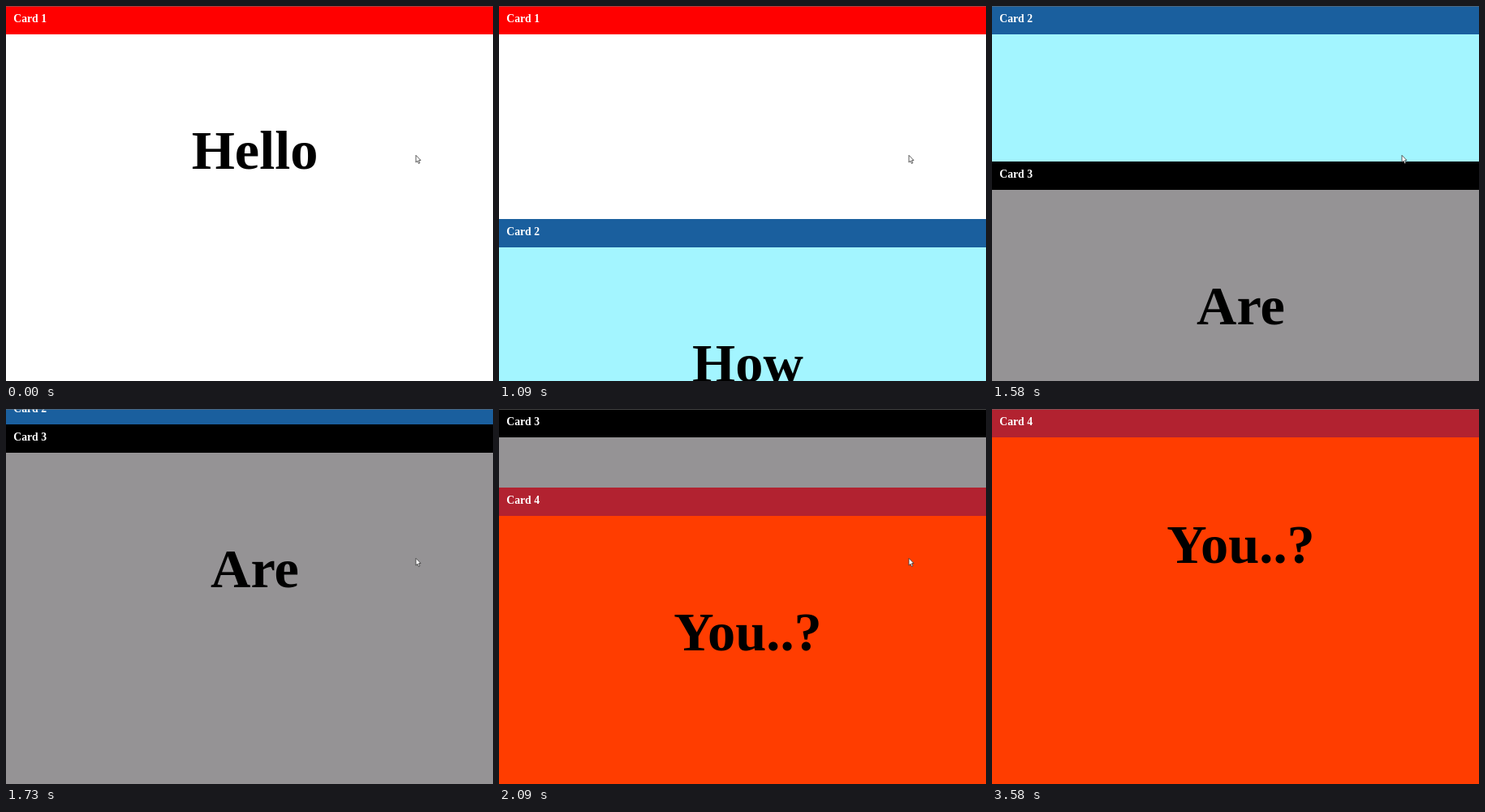
Recreate the animation shown at these times as an HTML page with a canvas. Size 600 by 463 pixels, loop 4.27 s.

```html
<!DOCTYPE html>
<html lang="en">
<head>
<meta charset="utf-8">
<title>Stacking cards</title>
<style>
  html, body { margin: 0; width: 100%; height: 100%; overflow: hidden; background: #fff; }
  canvas { display: block; }
</style>
</head>
<body>
<canvas id="stage" width="600" height="463"></canvas>
<script>
const ctx = document.getElementById('stage').getContext('2d');
const WIDTH = 600, HEIGHT = 463, LOOP = 4270;
const CARD_HEIGHT = 476, HEADER_HEIGHT = 35;
const SERIF = '"Liberation Serif", "Times New Roman", serif';

const cards = [
  { word: 'Hello', header: '#ff0000', body: '#ffffff' },
  { word: 'How', header: '#1a5f9e', body: '#a3f5ff' },
  { word: 'Are', header: '#000000', body: '#959395' },
  { word: 'You..?', header: '#b22230', body: '#ff3d00' },
];

// [time, scroll offset] while the wheel is turning
const scrollKeys = [
  [0, 0], [390, 0], [420, 7], [460, 15], [500, 21], [540, 25], [580, 28],
  [880, 28], [910, 33], [940, 48], [970, 74], [1300, 455],
  [1580, 760], [1910, 1141], [1970, 1217],
];
const SCROLL_END = 1439, COAST_START = 1970, COAST_TIME = 560;

// The picture advances in ticks of 30 ms
function tick(t) {
  const phase = t < 1500 ? 10 : t < 2300 ? 20 : 0;
  return Math.floor((t - phase) / 30) * 30 + phase;
}

function scrollAt(t) {
  if (t >= COAST_START) {
    const left = 1 - Math.min(1, (t - COAST_START) / COAST_TIME);
    return SCROLL_END - (SCROLL_END - 1217) * left ** 3;
  }
  const next = scrollKeys.findIndex(([time]) => time > t);
  if (next < 1) return 0;
  const [t0, s0] = scrollKeys[next - 1], [t1, s1] = scrollKeys[next];
  return s0 + (s1 - s0) * (t - t0) / (t1 - t0);
}

function fillBox(color, y, height) {
  ctx.fillStyle = color;
  ctx.fillRect(0, y, WIDTH, height);
}

function drawCard(card, index, scroll) {
  const top = index * CARD_HEIGHT - scroll;
  const bottom = top + CARD_HEIGHT;
  if (top >= HEIGHT || bottom <= 0) return;

  fillBox(card.body, top, CARD_HEIGHT);
  ctx.fillStyle = '#000';
  ctx.font = `bold 68.4px ${SERIF}`;
  ctx.textAlign = 'center';
  ctx.fillText(card.word, 306.5, top + 201);

  // Sticky header, pushed out by the end of its card
  const headerTop = Math.min(Math.max(top, 0), bottom - HEADER_HEIGHT);
  fillBox(card.header, headerTop, HEADER_HEIGHT);
  ctx.fillStyle = '#fff';
  ctx.font = `bold 13.7px ${SERIF}`;
  ctx.textAlign = 'left';
  ctx.fillText(`Card ${index + 1}`, 9.3, headerTop + 20);
}

function drawCursor(t) {
  if (t >= 3360) return;
  const away = Math.max(0, Math.floor((t - 3150) / 30) / 6) ** 1.4;
  ctx.save();
  ctx.translate(505 + 13 * away, 184.3 - 166 * away);
  ctx.beginPath();
  for (const [x, y] of [[0, 0], [0, 8.8], [2, 7], [3.4, 10.2], [4.8, 9.5], [3.5, 6.4], [6, 6.2]]) {
    ctx.lineTo(x, y);
  }
  ctx.closePath();
  ctx.fillStyle = '#fff';
  ctx.fill();
  ctx.lineWidth = 0.8;
  ctx.strokeStyle = '#333';
  ctx.stroke();
  ctx.restore();
}

function draw(now) {
  const t = now % LOOP;
  const scroll = Math.round(scrollAt(tick(t)));
  fillBox('#fff', 0, HEIGHT);
  cards.forEach((card, index) => drawCard(card, index, scroll));
  fillBox('rgba(110, 110, 110, 0.6)', 0, 1);
  drawCursor(t);
}

const start = performance.now();
function frame() {
  draw(performance.now() - start);
  requestAnimationFrame(frame);
}
frame();
</script>
</body>
</html>
```
